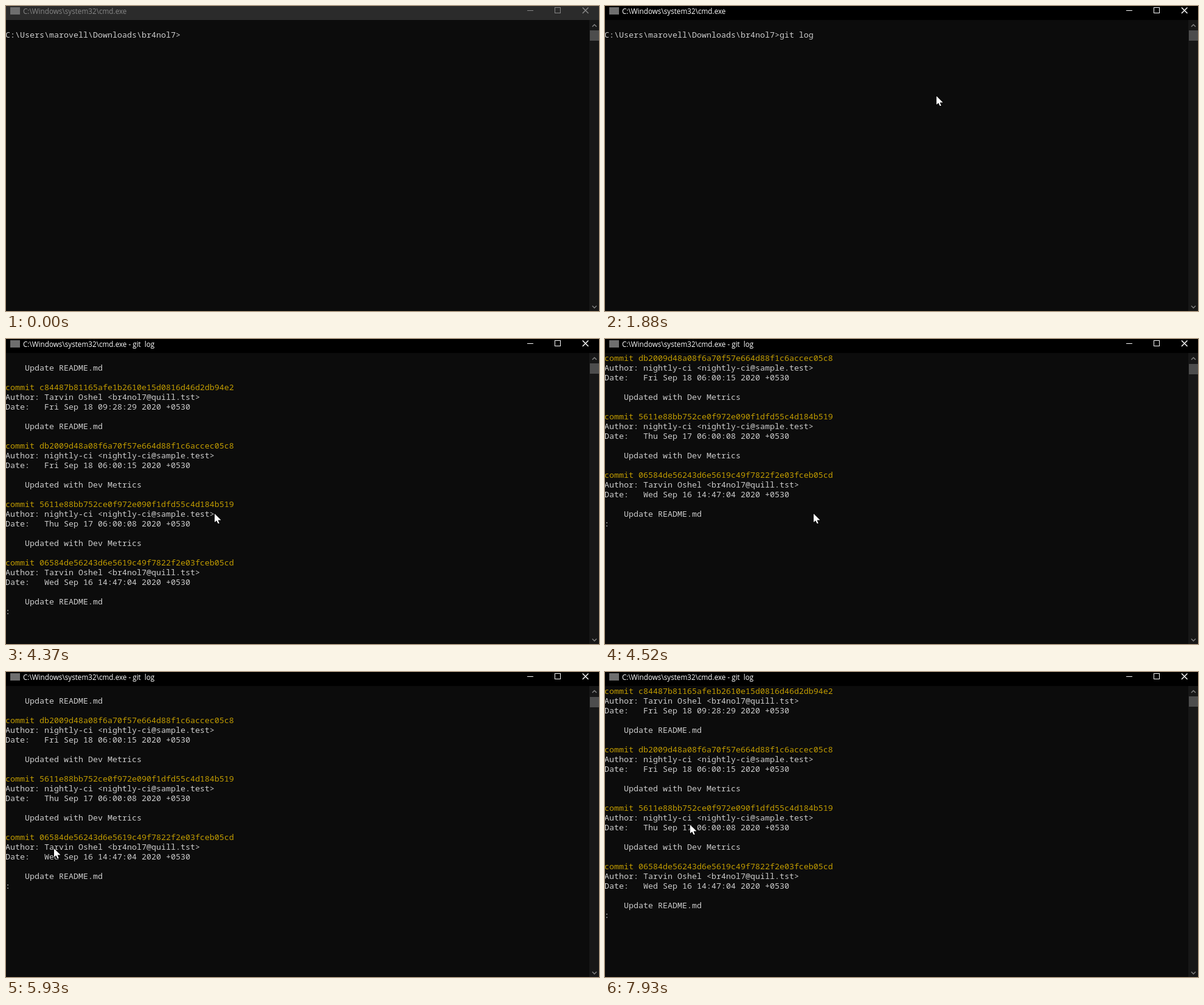
An HTML page that plays this animation: 975 px wide and 501 px high, repeating every 8 s.

```html
<!DOCTYPE html>
<html lang="en">
<head>
<meta charset="utf-8">
<title>Console</title>
<style>
  html, body { margin: 0; width: 100%; height: 100%; overflow: hidden; background: #0c0c0c; }
  #stage { position: absolute; left: 0; top: 0; width: 975px; height: 501px; overflow: hidden; background: #0c0c0c; }
  #bar { position: absolute; left: 0; top: 0; width: 975px; height: 23px; background: #2b2b2b; color: #878787; }
  #bar.active { background: #000; color: #fff; }
  #title { position: absolute; left: 28px; top: 0; font: 11.7px/16px "Open Sans", sans-serif; white-space: pre; }
  svg { position: absolute; left: 0; top: 0; overflow: visible; }
  #view { position: absolute; left: 0; top: 23px; width: 959px; height: 478px; overflow: hidden; }
  #buffer { position: absolute; left: -1px; top: 0; }
  pre { margin: 0; color: #ccc; font: 13.3333px/16px "Noto Sans Mono", monospace; font-variant-ligatures: none; }
  .yellow { color: #c19c00; }
  .cyan { color: #61d6d6; }
  .green { color: #16c60c; }
  .red { color: #e74856; }
  #caret { position: absolute; left: 0; top: 0; width: 8px; height: 4px; background: #f2f2f2; }
  #track { position: absolute; left: 959px; top: 23px; width: 16px; height: 478px; background: #171717; }
  #thumb { position: absolute; left: 1px; top: 17px; width: 15px; height: 17px; background: #4d4d4d; }
</style>
</head>
<body>
<div id="stage">
  <div id="bar">
    <svg width="975" height="23" fill="none" stroke="currentColor">
      <rect x="7" y="2" width="16" height="12" fill="#6e6e6e" stroke="none"/>
      <path d="M857 7.5h10M902.5 2.5h9v9h-9z" shape-rendering="crispEdges"/>
      <path d="M948 2.5l9.5 9.5M957.5 2.5l-9.5 9.5" stroke-width="1.5"/>
    </svg>
    <div id="title"></div>
  </div>
  <div id="view"><div id="buffer"><pre id="text"></pre><div id="caret"></div></div></div>
  <div id="track">
    <div id="thumb"></div>
    <svg width="16" height="478" fill="none" stroke="#808080" stroke-width="1.5">
      <path d="M5 11l3.5-3.5L12 11M5 469.5l3.5 3.5 3.5-3.5"/>
    </svg>
  </div>
  <svg id="mouse" width="12" height="18">
    <path d="M0 0V14L3.2 11.2 5.6 16H7.8L5.6 10.6H10.6Z" fill="#fff" stroke="#000" stroke-width="1.6" paint-order="stroke"/>
  </svg>
</div>
<script>
const $ = id => document.getElementById(id);
const [bar, title, buffer, text, caret, thumb, mouse] =
  ["bar", "title", "buffer", "text", "caret", "thumb", "mouse"].map($);

const path = "C:\\Windows\\system32\\cmd.exe";
const prompt = "C:\\Users\\marovell\\Downloads\\br4nol7>";
const command = "git log";

const person = "Tarvin Oshel &lt;br4nol7@quill.tst&gt;";
const bot = "nightly-ci &lt;nightly-ci@sample.test&gt;";
const edit = "Update README.md", metrics = "Updated with Dev Metrics";
const commits = [
  ["9957ffa230b0bea7b3436551d86e1a62b3d1bcf2", person, "Fri Sep 18 17:44:01", edit],
  ["c84487b81165afe1b2610e15d0816d46d2db94e2", person, "Fri Sep 18 09:28:29", edit],
  ["db2009d48a08f6a70f57e664d88f1c6accec05c8", bot, "Fri Sep 18 06:00:15", metrics],
  ["5611e88bb752ce0f972e090f1dfd55c4d184b519", bot, "Thu Sep 17 06:00:08", metrics],
  ["06584de56243d6e5619c49f7822f2e03fceb05cd", person, "Wed Sep 16 14:47:04", edit],
];
const paint = (color, s) => `<span class="${color}">${s}</span>`;
const refs = " (" + paint("cyan", "HEAD -&gt; ") + paint("green", "master") + ", " +
  paint("red", "origin/master") + ", " + paint("red", "origin/HEAD") + ")";
const log = commits.map(([hash, author, date, note], i) =>
  paint("yellow", `commit ${hash}${i ? "" : refs}`) +
  `\nAuthor: ${author}\nDate:   ${date} 2020 +0530\n\n    ${note}\n`).join("\n") + ":";

// Times in ms
const LOOP = 8000, FRAME = 77, BLINK = 550;
const FOCUS = 300, TYPE = 940, KEY = 153, ENTER = 2030, OUTPUT = 3520;
const WHEEL = 4370, SPIN = 320, BACK = 4840, NOTCH = 150, NUDGE = 7150;

const entrance = { x: 590, y: 405 };
const glides = [
  { start: 70, steps: 5, x: 545, y: 148 },
  { start: 3910, steps: 5, x: 343, y: 287 },
  { start: 4840, steps: 1, x: 345, y: 289 },
  { start: 5240, steps: 9, x: 79, y: 290 },
  { start: 6080, steps: 5, x: 131, y: 290 },
  { start: 6540, steps: 10, x: 138, y: 256 },
  { start: 7390, steps: 5, x: 140, y: 251 },
];

const clamp = (v, low, high) => Math.min(high, Math.max(low, v));
const ease = p => p * p * (3 - 2 * p);
// How many of `max` evenly spaced ticks have happened
const ticks = (t, start, gap, max) => clamp(Math.floor((t - start) / gap) + 1, 0, max);

// The wheel spins down five notches while slowing, then returns notch by notch, three lines each
function scrolled(t) {
  const spin = clamp((t - WHEEL) / SPIN, 0, 1) ** 0.37;
  const down = t < WHEEL ? 0 : 1 + Math.floor(4 * spin);
  return 3 * (down - ticks(t, BACK, NOTCH, 2) - (t >= NUDGE));
}

function caretOn(t) {
  if (t < FOCUS) return false;
  if (t >= TYPE && t < TYPE + KEY * (command.length - 1)) return true;
  const origin = t >= OUTPUT ? OUTPUT + 220 : t >= ENTER ? ENTER - 150 : FOCUS - 70;
  return Math.floor(Math.max(0, t - origin) / BLINK) % 2 === 0;
}

function pointer(t) {
  let at = entrance;
  for (const { start, steps, x, y } of glides) {
    const p = ease(ticks(t, start, FRAME, steps) / steps);
    at = { x: at.x + (x - at.x) * p, y: at.y + (y - at.y) * p };
  }
  return at;
}

let shown;
function setText(html) {
  if (html !== shown) text.innerHTML = shown = html;
}

function draw(t) {
  const typed = ticks(t, TYPE, KEY, command.length);
  const scroll = scrolled(t);
  const line = prompt + command.slice(0, typed);
  const [col, row] = t >= OUTPUT ? [1, 29] : t >= ENTER ? [0, 2] : [line.length, 1];

  bar.className = t >= FOCUS ? "active" : "";
  title.textContent = path + (t >= ENTER ? " - git  log" : "");
  setText(t >= OUTPUT ? log : "\n" + line.replace(">", "&gt;"));
  buffer.style.transform = `translateY(${-16 * scroll}px)`;
  caret.style.transform = `translate(${8 * col}px, ${16 * row + 12}px)`;
  caret.style.visibility = caretOn(t) ? "visible" : "hidden";
  thumb.style.top = 17 + (scroll >= 9) + "px";

  const { x, y } = pointer(t);
  mouse.style.visibility = t >= glides[0].start ? "visible" : "hidden";
  mouse.style.transform = `translate(${Math.round(x)}px, ${Math.round(y)}px)`;
}

const begin = performance.now();
function tick() {
  draw((performance.now() - begin) % LOOP);
  requestAnimationFrame(tick);
}
tick();
</script>
</body>
</html>
```
